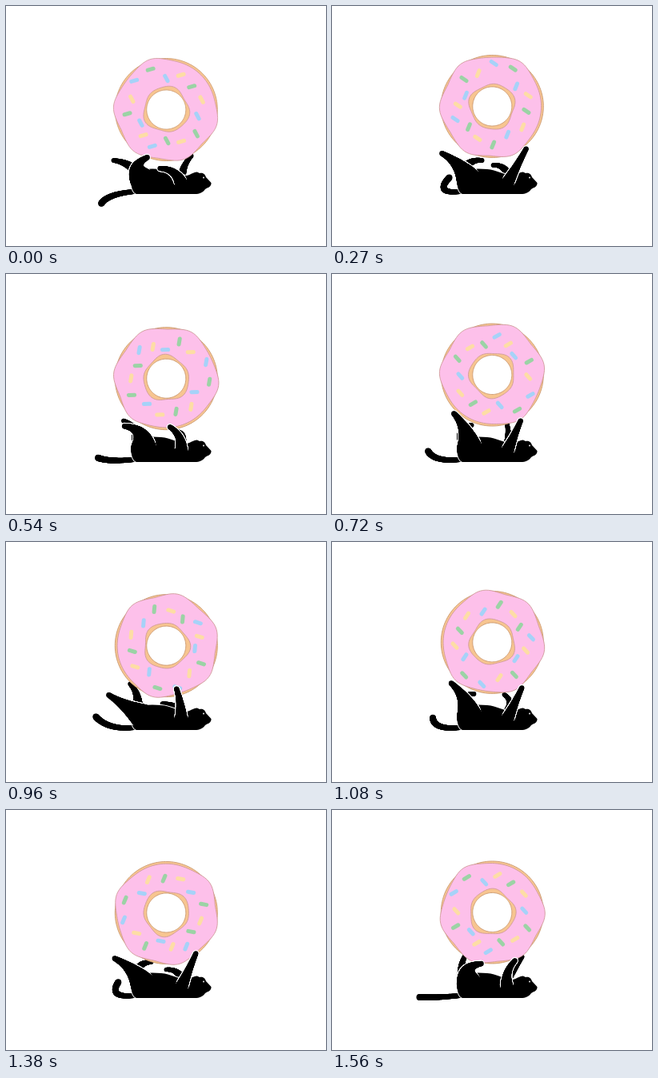
Recreate the animation shown at these times as an HTML page with a canvas. Size 400 by 300 pixels, loop 1.59 s.

```html
<!DOCTYPE html>
<html lang="en">
<head>
<meta charset="utf-8">
<title>Cat rolling a donut</title>
<style>
  html, body { margin: 0; width: 100%; height: 100%; overflow: hidden; background: #fff; }
  canvas { display: block; width: 400px; height: 300px; }
</style>
</head>
<body>
<canvas id="stage" width="400" height="300"></canvas>
<script>
const ctx = document.getElementById('stage').getContext('2d');
const LOOP = 1590, STEP = 30, BOBS = 4, RAD = Math.PI / 180;

// time, donut angle, pose count (five poses make one paddling cycle)
const timeline = [
  [0, 0, 0], [270, 50, 2], [420, 82, 4], [720, 166, 8],
  [960, 213, 11], [1230, 278, 15], [1560, 345, 19], [1590, 360, 20]
];

// root joint, bone length, thickness at root and tip, tip position in each pose
const tail = { root: [160, 232], knee: [127, 235], thick: [3, 3.9],
  tips: [[119, 247], [112, 218], [147, 214], [120, 221], [109, 234]] };
const farLeg = { root: [164, 208], bone: 18, thick: [7, 2.8],
  tips: [[134, 193], [155, 177], [188, 193], [175, 189], [166, 183]] };
const nearLeg = { root: [172, 219], bone: 26, thick: [16, 3.2],
  tips: [[177, 189], [128, 191], [137, 184], [152, 174], [187, 192]] };
const farArm = { root: [220, 211], bone: 14, thick: [5, 2.6],
  tips: [[232, 187], [195, 202], [201, 199], [219, 188], [238, 183]] };
const nearArm = { root: [219, 222], bone: 20, thick: [8, 3],
  tips: [[192, 203], [213, 183], [243, 178], [236, 183], [229, 188]] };

const drips = [-177, -108, 17, 70, 128];
const tints = { g: '#9bd3a5', b: '#a6d2f8', y: '#fddda5' };
// One letter per sprinkle: its colour; capitals stand steep, the others lie flat
const sprinkles = 'gBygYBGyGbyBgYb';
const sprinkleRadii = [54, 39, 47, 43, 46, 40, 48, 44, 39, 49, 43, 36, 49, 45, 54];

const mix = (a, b, k) => a + (b - a) * k;
const mixAll = (a, b, k) => a.map((v, i) => mix(v, b[i], k));
const polar = (deg, r) => [r * Math.cos(deg * RAD), r * Math.sin(deg * RAD)];

function sample(t) {
  const i = timeline.findIndex(row => row[0] > t);
  const a = timeline[i - 1], b = timeline[i];
  return mixAll(a, b, (t - a[0]) / (b[0] - a[0]));
}

function disc(x, y, r) {
  ctx.beginPath();
  ctx.arc(x, y, r, 0, 7);
  ctx.fill();
}

// The joint bends so that it stays above the root
function bend([rx, ry], [tx, ty], bone) {
  const dx = tx - rx, dy = ty - ry, d = Math.hypot(dx, dy);
  const side = Math.max(-1, Math.min(1, dx / 5));
  const offset = side * Math.sqrt(Math.max(0, bone ** 2 - d ** 2 / 4)) / d;
  return [rx + dx / 2 + dy * offset, ry + dy / 2 - dx * offset];
}

// Tapered curve of discs; a thin white edge separates near limbs from the body
function limb({ root, knee, bone, thick, tips }, pose, edged) {
  const i = Math.floor(pose);
  const tip = mixAll(tips[i % 5], tips[(i + 1) % 5], pose - i);
  const joint = knee || bend(root, tip, bone);
  const chain = (start, grow) => {
    for (let u = start; u <= 1; u += .01) {
      const [x, y] = mixAll(mixAll(root, joint, u), mixAll(joint, tip, u), u);
      disc(x, y, mix(thick[1], thick[0], (1 - u) ** 1.5) + grow);
    }
  };
  if (edged) {
    ctx.fillStyle = '#fff';
    chain(.1, 1.2);
  }
  ctx.fillStyle = '#000';
  chain(0, 0);
}

function wavyRing(radiusAt) {
  for (let a = 0; a < 360; a += 3) ctx[a ? 'lineTo' : 'moveTo'](...polar(a, radiusAt(a)));
  ctx.closePath();
}

function rimRadius(a) {
  const gap = d => Math.abs(((a - d) % 360 + 540) % 360 - 180);
  return 61.3 + 4.7 * Math.max(...drips.map(d => Math.exp(-((gap(d) / 17) ** 2))));
}

const holeRadius = a => 28.2 + 1.3 * Math.sin(3 * a * RAD) + Math.sin((5 * a + 60) * RAD);

function ring(fill, stroke, outer, inner) {
  ctx.beginPath();
  wavyRing(outer);
  wavyRing(inner);
  ctx.fillStyle = fill;
  ctx.strokeStyle = stroke;
  ctx.lineWidth = .8;
  ctx.fill('evenodd');
  ctx.stroke();
}

function donut(angle, x, y) {
  ctx.save();
  ctx.translate(x, y);
  ctx.rotate(angle * RAD);
  ring('#f7c590', '#c9976f', () => 64, () => 24.5);
  ring('#fdc0ea', '#cf9a98', rimRadius, holeRadius);
  ctx.lineWidth = 5;
  ctx.lineCap = 'round';
  [...sprinkles].forEach((letter, i) => {
    const spread = 24 * i - 109 + 6 * Math.cos((i - 7.5) * 33 * RAD);
    const [sx, sy] = polar(spread, sprinkleRadii[i]);
    const [dx, dy] = polar(letter < 'a' ? 62 : -16, 3.6);
    ctx.strokeStyle = tints[letter.toLowerCase()];
    ctx.beginPath();
    ctx.moveTo(sx - dx, sy - dy);
    ctx.lineTo(sx + dx, sy + dy);
    ctx.stroke();
  });
  ctx.restore();
}

const body = new Path2D(`M163 235 C155 232 155 213 160 207 C170 203 184 203 194 204
  C206 205 214 211 226 212 C231 211 233 208 239 207.5 L242 209 C247 208 249 211 250 214
  L256.5 221 C257 226 252 227 249 229 C246 233 242 235 236 235 Z`);

function draw(t) {
  const [, angle, pose] = sample(t);
  ctx.fillStyle = '#fff';
  ctx.fillRect(0, 0, 400, 300);
  limb(tail, pose);
  limb(farLeg, pose);
  limb(farArm, pose);
  donut(angle, 200.3, 128.7 + 3.3 * Math.sin(t / LOOP * BOBS * 2 * Math.PI + .25));
  ctx.fillStyle = '#000';
  ctx.strokeStyle = '#fff';
  ctx.lineWidth = 2;
  ctx.stroke(body);
  ctx.fill(body);
  limb(nearLeg, pose, true);
  limb(nearArm, pose, true);
  ctx.fillStyle = '#fff';
  disc(247, 214.5, .9);
}

function tick() {
  draw(Math.floor(performance.now() % LOOP / STEP) * STEP);
  requestAnimationFrame(tick);
}
tick();
</script>
</body>
</html>
```
